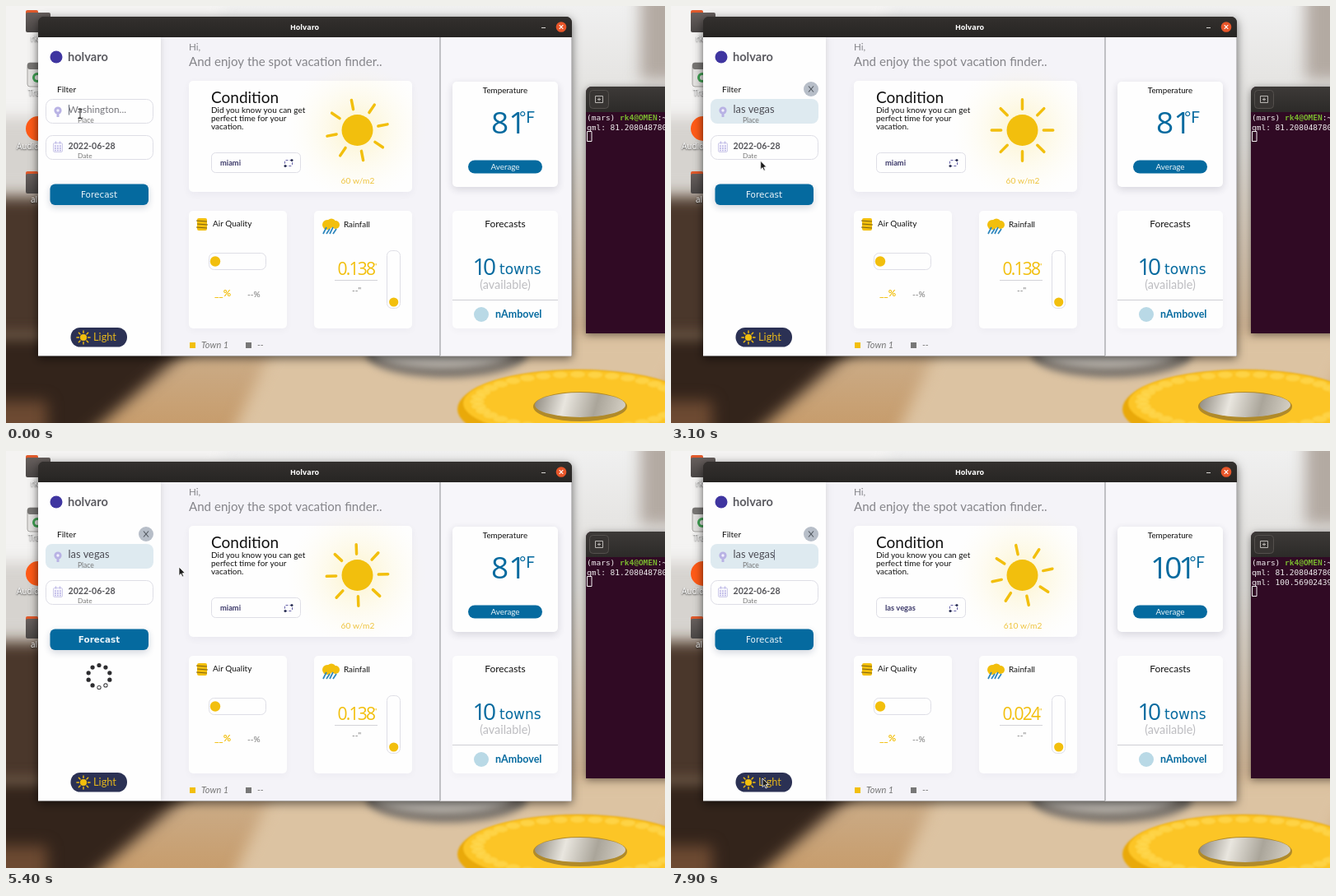
Recreate the animation shown at these times as an HTML page with a canvas. Size 800 by 507 pixels, loop 8 s.

```html
<!DOCTYPE html>
<html lang="en">
<head>
<meta charset="utf-8">
<title>Holvaro</title>
<style>
  html, body { margin: 0; width: 100%; height: 100%; overflow: hidden; }
  canvas { display: block; width: 800px; height: 507px; }
</style>
</head>
<body>
<canvas id="stage" width="800" height="507"></canvas>
<script>
const W = 800, H = 507, LOOP = 8000;
const YELLOW = '#f2bf0d', BLUE = '#056a9f', NAVY = '#2b3154', GRAY = '#777777';
const INK = '#111', PAPER = '#fefefe', BORDER = '#dedee6', LILAC = '#b8b2e4';
const OPEN = { font: '"Open Sans", sans-serif' };
const DEJAVU = { font: '"DejaVu Sans", sans-serif' };
const MONO = { font: '"DejaVu Sans Mono", monospace' };
const MID = { align: 'center' }, BOLD = { weight: 700 };

const view = document.getElementById('stage').getContext('2d');
const base = document.createElement('canvas');
base.width = W;
base.height = H;
let g = base.getContext('2d');

function text(s, x, y, size, color, ...options) {
  const o = Object.assign({ font: 'Lato, sans-serif', weight: 400, style: '', align: 'left', gap: 0 }, ...options);
  g.font = `${o.style} ${o.weight} ${size}px ${o.font}`;
  g.textAlign = o.align;
  g.letterSpacing = o.gap + 'px';
  g.fillStyle = color;
  g.fillText(s, x, y);
  return g.measureText(s).width;
}

function box(x, y, w, h, r, fill, stroke) {
  g.beginPath();
  g.roundRect(x, y, w, h, r);
  if (fill) { g.fillStyle = fill; g.fill(); }
  if (stroke) { g.strokeStyle = stroke; g.lineWidth = 1; g.stroke(); }
}

function disc(x, y, r, fill, ry = r) {
  g.beginPath();
  g.ellipse(x, y, r, ry, 0, 0, Math.PI * 2);
  g.fillStyle = fill;
  g.fill();
}

function line(color, width, x0, y0, x1, y1) {
  g.beginPath();
  g.moveTo(x0, y0);
  g.lineTo(x1, y1);
  g.strokeStyle = color;
  g.lineWidth = width;
  g.stroke();
}

function cross(color, x, y, rx, ry = rx) {
  line(color, 1.1, x - rx, y - ry, x + rx, y + ry);
  line(color, 1.1, x + rx, y - ry, x - rx, y + ry);
}

// slanted band: bottom edge is moved sideways by lean
function band(fill, x, y, w, h, lean = 0) {
  g.beginPath();
  g.moveTo(x, y);
  g.lineTo(x + w, y);
  g.lineTo(x + w + lean, y + h);
  g.lineTo(x + lean, y + h);
  g.fillStyle = fill;
  g.fill();
}

function shade(x0, y0, x1, y1, ...colors) {
  const k = g.createLinearGradient(x0, y0, x1, y1);
  colors.forEach((c, i) => k.addColorStop(i / (colors.length - 1), c));
  return k;
}

function shadowed(color, blur, dy, draw) {
  g.save();
  g.shadowColor = color;
  g.shadowBlur = blur;
  g.shadowOffsetY = dy;
  draw();
  g.restore();
}

// calls draw(cos, sin, i) for n directions, the first one pointing up
function around(n, turn, draw) {
  for (let i = 0; i < n; i++) {
    const a = (turn + i * 360 / n - 90) * Math.PI / 180;
    draw(Math.cos(a), Math.sin(a), i);
  }
}

function sun(x, y, r, turn) {
  disc(x, y, r, YELLOW);
  g.lineCap = 'round';
  around(8, turn, (c, s) =>
    line(YELLOW, .8 + r * .14, x + c * r * 1.36, y + s * r * 1.36, x + c * r * 1.96, y + s * r * 1.96));
  g.lineCap = 'butt';
}

const ease = k => k * k * (3 - 2 * k);
const part = (t, from, to) => Math.max(0, Math.min(1, (t - from) / (to - from)));

function drawDesk() {
  g.fillStyle = shade(0, 0, 0, H, '#f0f0f0', '#dcdad6', '#cfbba3', '#c79d6d');
  g.fillRect(0, 0, W, H);
  g.filter = 'blur(9px)';
  band('#f4f3f2', -30, -30, 300, 190, -40);
  band('#d6d3cf', -30, 135, 90, 90);
  band('#b3aaa2', 770, -20, 60, 110);
  band('#dcc3a2', 330, 400, 500, 130, -60);
  band('#4a372b', -40, 232, 120, 170);
  band('#33241b', -60, 400, 300, 130, -150);
  band('#6d4a32', -60, 480, 110, 50);
  g.filter = 'blur(4px)';
  disc(535, 424, 98, '#7d766e', 28);
  disc(530, 418, 86, '#b9b4ad', 22);
  g.filter = 'blur(1px)';
  disc(695, 490, 147, '#e9a90a', 48);
  disc(694, 483, 139, '#fcc526', 40);
  around(36, 0, (c, s) => disc(694 + c * 122, 481 + s * 33, 9, 'rgba(255,222,95,.55)', 4));
  g.filter = 'none';
  disc(697, 487, 57, '#b08a2a', 18);
  disc(697, 485, 55, shade(642, 470, 752, 500, '#8c877d', '#e9e6df', '#aaa59a', '#d8d3c8'), 15);
}

function drawIcons() {
  for (const y of [5, 201]) {
    box(24, y, 15, 8, 2, '#e0592b');
    box(24, y + 3, 30, 24, 2, shade(0, y, 0, y + 27, '#6a6260', '#4a4645'));
  }
  box(26, 69, 26, 29, 3, '#e4e3e1', '#a6a4a2');
  box(26, 69, 26, 8, 3, '#777573');
  disc(38, 87, 6, '#3fa052');
  disc(38, 87, 3, '#e4e3e1');
  disc(39, 149, 15, '#ff5a17');
  shadowed('rgba(0,0,0,.8)', 2, 1, () => {
    text('rk', 30, 43, 10, '#fff', OPEN);
    text('Trash', 27, 109, 10, '#fff', OPEN);
    text('Audiobox', 13, 174, 10, '#fff', OPEN);
    text('al', 30, 239, 10, '#fff', OPEN);
  });
}

function output(s, row) {
  text(s, 705, 139 + row * 12, 9.5, '#f2eff1', MONO);
}

function drawTerminal() {
  shadowed('rgba(0,0,0,.45)', 10, 2, () => box(704, 98, 120, 300, [7, 0, 0, 0], '#300a24'));
  box(704, 98, 120, 31, [7, 0, 0, 0], shade(0, 98, 0, 129, '#3d3a38', '#2c2a28'));
  box(708.5, 102.5, 23, 22, 4, '#383533', '#54504d');
  box(715.5, 109.5, 9, 8, 0, null, '#b9b6b3');
  line('#b9b6b3', 1, 718, 113.5, 722, 113.5);
  line('#b9b6b3', 1, 720, 111.5, 720, 115.5);
  output('(mars)         :~', 0);
  text('rk4@OMEN', 745, 139, 9.5, '#79b72f', MONO, BOLD);
  output('qml: 81.208048780', 1);
}

function card(x, y, w, h, alpha = .03) {
  shadowed(`rgba(40,40,70,${alpha})`, 10, 3, () => box(x, y, w, h, 5, PAPER));
}

function drawSidebar() {
  shadowed('rgba(0,0,0,.14)', 7, 0, () => band(PAPER, 39, 38, 149, 387));
  disc(61, 62, 7.5, '#3f35a0');
  text('holvaro', 75, 66.5, 14.6, '#5c5c62', BOLD);
  text('Filter', 62, 105, 10.1, INK);
  box(48.5, 157.5, 130, 29, 8, PAPER, BORDER);
  text('2022-06-28', 75.5, 173.5, 10.6, '#55555a', BOLD);
  text('Date', 87, 184.5, 8.4, GRAY);
  box(57.5, 166.5, 11, 11, 1.5, '#f6f5fd', '#cfccea');
  for (let i = 0; i < 9; i++) band(LILAC, 59 + i % 3 * 3, 169.5 + Math.floor(i / 3) * 2.6, 1.8, 1.6);
  for (const x of [60.5, 65.5]) line(LILAC, 1.2, x, 164.5, x, 167.5);
  shadowed('rgba(30,50,90,.2)', 9, 3, () => box(53.5, 216.5, 119.5, 25.5, 6, BLUE));
  box(78.5, 391, 68.5, 23.5, 11.5, NAVY);
  sun(94, 403, 4.1, 0);
  text('Light', 106, 407, 12.8, '#e2b41c');
}

function drawCondition() {
  card(222, 91, 271, 135, .05);
  const glow = g.createRadialGradient(426, 151, 15, 426, 151, 85);
  glow.addColorStop(0, 'rgba(250,228,130,.3)');
  glow.addColorStop(1, 'rgba(255,248,220,0)');
  band(glow, 330, 60, 192, 166);
  text('Condition', 249, 118, 19, INK);
  ['Did you know you can get', 'perfect time for your', 'vacation.']
    .forEach((s, i) => text(s, 249, 129.5 + i * 10.3, 10, INK));
  box(249.5, 178.5, 108, 24, 5, PAPER, BORDER);
  g.setLineDash([3, 2]);
  box(338.5, 187.5, 9, 7, 1, null, '#6661a8');
  g.setLineDash([]);
  disc(347, 187.5, 1.5, NAVY);
  disc(339, 194.5, 1.5, NAVY);
}

function drawAir() {
  card(222, 249, 119, 143);
  box(232, 258, 12, 15, 2, YELLOW);
  for (let i = 0; i < 3; i++) line('#7d6113', 1.1, 231 + i % 2, 261 + i * 4, 244 + i % 2, 262 + i * 4);
  text('Air Quality', 251, 268, 10, INK);
  box(246.5, 300.5, 69, 20, 6, PAPER, BORDER);
  disc(254, 310.5, 6.2, YELLOW);
  text('__%', 253, 352.5, 11.5, YELLOW, BOLD);
  text('--%', 293, 353.5, 10.2, GRAY);
}

function drawRain() {
  card(374, 249, 119, 143);
  for (let i = 0; i < 3; i++) disc(390 + i * 5, 266 - i % 2 * 2, 6 - i * .5, YELLOW);
  for (let i = 0; i < 4; i++) line('#2d86bd', 1.7, 389 + i * 4, 269 + i % 2 * 2, 385 + i * 4, 277);
  text('Rainfall', 410, 268.5, 9.9, INK);
  line('#d3d3d8', 1, 399, 333.5, 451, 333.5);
  text('--"', 420, 349, 10, GRAY);
  box(462.5, 297.5, 16, 70, 6, PAPER, BORDER);
  disc(470.7, 360, 5.6, YELLOW);
}

function drawRight() {
  card(542, 92, 128, 128, .16);
  text('Temperature', 606, 106, 9.8, INK, MID);
  box(561, 187.5, 90, 16, 8, BLUE);
  text('Average', 606, 199, 9.9, '#e8f3f8', MID);
  card(542, 249, 128, 143);
  text('Forecasts', 606, 268.5, 11.9, INK, MID);
  text('10', 566.5, 327, 28, BLUE, OPEN, { gap: -3.5 });
  text('towns', 599, 326, 17, BLUE, DEJAVU);
  text('(available)', 606, 343.5, 14.4, '#bdbdc1', MID);
  line('#cfcfd4', 1, 542, 357.5, 670, 357.5);
  disc(577, 375, 9, '#b9d9e6');
  text('nAmbovel', 594, 379, 12.5, BLUE, BOLD);
}

function drawWindow() {
  shadowed('rgba(0,0,0,.55)', 12, 3, () => box(39, 13, 648, 412.5, [7, 7, 0, 0], '#2c2a28'));
  box(39, 13, 648, 25, [7, 7, 0, 0], shade(0, 13, 0, 38, '#33302e', '#272523'));
  text('Holvaro', 362.5, 29, 9, '#fff', OPEN, BOLD, MID);
  line('#d8d6d3', 1, 650, 26.5, 655, 26.5);
  disc(674, 25.5, 6.3, '#e8562a');
  cross('#fff', 674, 25.5, 2.3);
  band('#f4f3f8', 39, 38, 647.5, 387.5);
  band('#f7f6fa', 527, 38, 159.5, 387.5);
  line('#8b8b8f', 1, 527, 38, 527, 425);
  drawSidebar();
  text('Hi,', 222, 54, 11.6, '#85858a');
  text('And enjoy the spot vacation finder..', 222, 72.5, 15.1, '#85858a');
  drawCondition();
  drawAir();
  drawRain();
  drawRight();
  band(YELLOW, 223, 409, 7, 7);
  text('Town 1', 237, 415.5, 11, GRAY, { style: 'italic' });
  band(GRAY, 291, 409, 7, 7);
  text('--', 305, 415.5, 11, GRAY, { style: 'italic' });
}

const PLACE = 'las vegas', TYPE_FROM = 660, KEY_STEP = 220;
const PRESS = 3900, DONE = 5500;
const TURN_MS = 9000;

function drawField(t) {
  const n = Math.max(0, Math.min(PLACE.length, 1 + Math.floor((t - TYPE_FROM) / KEY_STEP)));
  if (n) {
    const k = ease(part(t, 1000, 1800));
    box(48, 113, 131, 30, 8, `rgb(${164 + 58 * k},${201 + 33 * k},${230 + 10 * k})`);
    disc(170, 101, 9, '#b7bec8');
    cross('#50565e', 170, 101, 3, 3.5);
  } else {
    box(48.5, 113.5, 130, 29, 8, PAPER, BORDER);
  }
  disc(63, 127, 4.6, LILAC);
  line(LILAC, 3, 63, 130, 63, 135);
  disc(63, 127, 1.7, '#f3f1fd');

  const typed = PLACE.slice(0, n);
  if (!n) text('Washington...', 75.5, 130.3, 11.8, '#77777d');
  const end = Math.round(75.5 + text(typed, 75.5, 130.3, 12.8, '#4c4c54')) + .5;
  const lastKey = n ? TYPE_FROM + (n - 1) * KEY_STEP : 0;
  if ((t - lastKey) % 1000 < 500) line('#6c7280', 1, end, 120, end, 132.5);
  text('Place', 87, 142, 8.5, GRAY);
}

function drawButton(t) {
  const busy = t >= PRESS && t < DONE;
  text('Forecast', 113, 232.7, 10.4, '#eaf4f9', DEJAVU, MID, { weight: busy ? 700 : 400 });
  if (!busy) return;
  const step = Math.floor(t / 100) % 10;
  around(10, 0, (c, s, i) => {
    const x = 113 + c * 13.5, y = 274 + s * 13.5;
    disc(x, y, 2.6, '#2d2d30');
    if ((i - step + 10) % 10 < 2) disc(x, y, 1.7, PAPER);
  });
}

function drawResults(t) {
  const r = t < DONE
    ? { place: 'miami', power: '60 w/m2', heat: '81', rain: '0.138', rows: 2, x: 589, gap: 0 }
    : { place: 'las vegas', power: '610 w/m2', heat: '101', rain: '0.024', rows: 3, x: 582, gap: -4 };
  sun(426.5, 151, 19, (3100 - t) * 360 / TURN_MS);
  text(r.place, 260, 194, 9.3, '#3a3768', BOLD);
  text(r.power, 427, 216, 10.2, '#eec33c', MID);
  const w = text(r.heat, r.x, 154.5, 37, BLUE, OPEN, { gap: r.gap });
  text('°F', r.x + w - 8 - r.gap, 142, 19, BLUE);
  text(r.rain, 402.5, 327, 21, YELLOW, OPEN, { gap: -1.8 });
  text('"', 447, 320, 9, YELLOW);
  if (r.rows > 2) output('qml: 100.56902439', 2);
  box(705.5, 128.5 + r.rows * 12, 5.5, 12, 0, null, '#f2eff1');
}

// field, button, resting place, switch
const STOPS = [[90, 131], [122, 229], [210, 141], [111, 398]];
const MOVES = [[2600, 3500], [4000, 4600], [6800, 7700]];

function pointerAt(t) {
  return MOVES.reduce(([x, y], [from, to], i) => {
    const k = ease(part(t, from, to)), [nx, ny] = STOPS[i + 1];
    return [x + (nx - x) * k, y + (ny - y) * k];
  }, STOPS[0]);
}

function drawPointer(t) {
  const [x, y] = pointerAt(t);
  if (y < 143 && x < 180) {
    line('#333', 1, x, y - 5, x, y + 5);
    for (const d of [-5.5, 5.5]) line('#333', 1, x - 2.5, y + d, x + 2.5, y + d);
    return;
  }
  const arrow = new Path2D('M0 0V10.5L2.4 8.3L4 12L5.7 11.3L4.1 7.7L7.3 7.5Z');
  g.save();
  g.translate(x, y);
  g.fillStyle = '#1c1c1c';
  g.fill(arrow);
  g.strokeStyle = '#fff';
  g.lineWidth = .8;
  g.stroke(arrow);
  g.restore();
}

function frame(now) {
  const t = Math.max(0, now - start) % LOOP;
  g = view;
  g.drawImage(base, 0, 0);
  drawField(t);
  drawButton(t);
  drawResults(t);
  drawPointer(t);
  requestAnimationFrame(frame);
}

drawDesk();
drawIcons();
drawTerminal();
drawWindow();
const start = performance.now();
frame(start);
</script>
</body>
</html>
```
